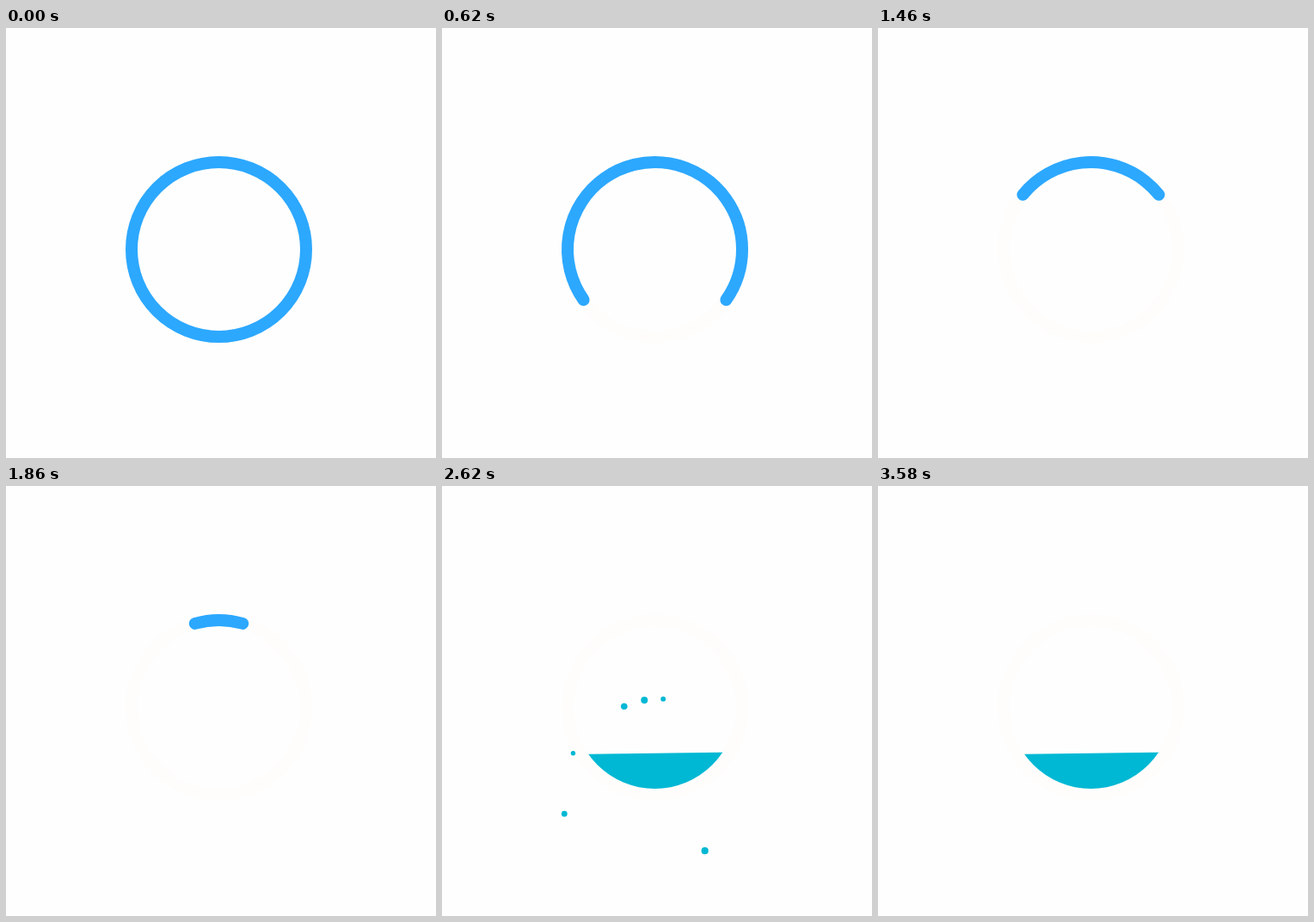
Animation of 500 by 500 pixels, one loop 3.62 s. Source, as an HTML page with a canvas:

```html
<!DOCTYPE html>
<html lang="en">
<head>
<meta charset="utf-8">
<title>Ring and water</title>
<style>
  html, body { margin: 0; width: 100%; height: 100%; overflow: hidden; background: #fefefe; }
  canvas { display: block; width: 500px; height: 500px; }
</style>
</head>
<body>
<canvas id="stage" width="500" height="500"></canvas>
<script>
const ctx = document.getElementById('stage').getContext('2d');
const LOOP = 3620, STEP = 20;
const CX = 247.5, CY = 257.5, RADIUS = 101.5, LINE = 14;
const BLUE = '#2ca8ff', CYAN = '#00b8d4', PAPER = '#fefefe', TRACK = '#fefdfc';
const RING_END = 2040, IMPACT = 2300, RISE = 160;
const GRAVITY = 0.001, REF = 2620;

// Position, velocity (px/ms) and radius are given at time REF.
const drops = [
  { x: 235.3, y: 249, vx: -0.0628, vy: -0.163, r: 4, shrink: 0, from: 2395, to: 3380 },
  { x: 257.2, y: 247.7, vx: 0.0708, vy: -0.048, r: 2.9, shrink: 0.0027, from: 2310, to: 3260 },
  { x: 211.8, y: 256.2, vx: -0.1031, vy: 0.001, r: 3.8, shrink: 0.0036, from: 2300, to: 3220 },
  { x: 152.5, y: 310.8, vx: -0.295, vy: 0.16, r: 2.7, shrink: 0.003, from: 2300, to: 2960 },
  { x: 142.3, y: 381.2, vx: -0.328, vy: 0.38, r: 3.4, shrink: 0.003, from: 2300, to: 2720 },
  { x: 305.7, y: 424.2, vx: 0.184, vy: 0.51, r: 4.1, shrink: 0.004, from: 2300, to: 2645 }
];

function dot(x, y, r, color) {
  ctx.fillStyle = color;
  ctx.beginPath();
  ctx.arc(x, y, Math.max(r, 0), 0, Math.PI * 2);
  ctx.fill();
}

function ringArc(half, color) {
  const top = -Math.PI / 2;
  ctx.strokeStyle = color;
  ctx.lineWidth = LINE;
  ctx.lineCap = 'round';
  ctx.beginPath();
  ctx.arc(CX, CY, RADIUS, top - half, top + half);
  ctx.stroke();
}

function water(level) {
  const sink = (1 - level) * 42;
  ctx.save();
  ctx.beginPath();
  ctx.arc(CX, CY, RADIUS - LINE / 2, 0, Math.PI * 2);
  ctx.clip();
  ctx.fillStyle = CYAN;
  ctx.beginPath();
  ctx.moveTo(140, 312.2 + sink);
  ctx.lineTo(356, 309.2 + sink);
  ctx.lineTo(356, 370);
  ctx.lineTo(140, 370);
  ctx.fill();
  ctx.restore();
}

function draw(t) {
  ctx.fillStyle = PAPER;
  ctx.fillRect(0, 0, 500, 500);
  ringArc(Math.PI, TRACK);

  if (t < RING_END) {
    ringArc(Math.PI * (1 - t / RING_END), BLUE);
  } else if (t < IMPACT) {
    const fall = (t - RING_END) / (IMPACT - RING_END);
    dot(CX, CY - RADIUS + 155 * fall ** 3, LINE / 2, BLUE);
  } else {
    const rise = Math.min((t - IMPACT) / RISE, 1);
    water(1 - (1 - rise) ** 2);
  }

  for (const d of drops) {
    if (t < d.from || t > d.to) continue;
    const dt = t - REF;
    const x = d.x + d.vx * dt;
    const y = d.y + d.vy * dt + GRAVITY * dt * dt / 2;
    dot(x, y, d.r - d.shrink * dt, CYAN);
  }
}

const start = performance.now();
function frame() {
  const t = (performance.now() - start) % LOOP;
  draw(Math.min(Math.floor(t / STEP) * STEP, LOOP - 2 * STEP));
  requestAnimationFrame(frame);
}
frame();
</script>
</body>
</html>
```
